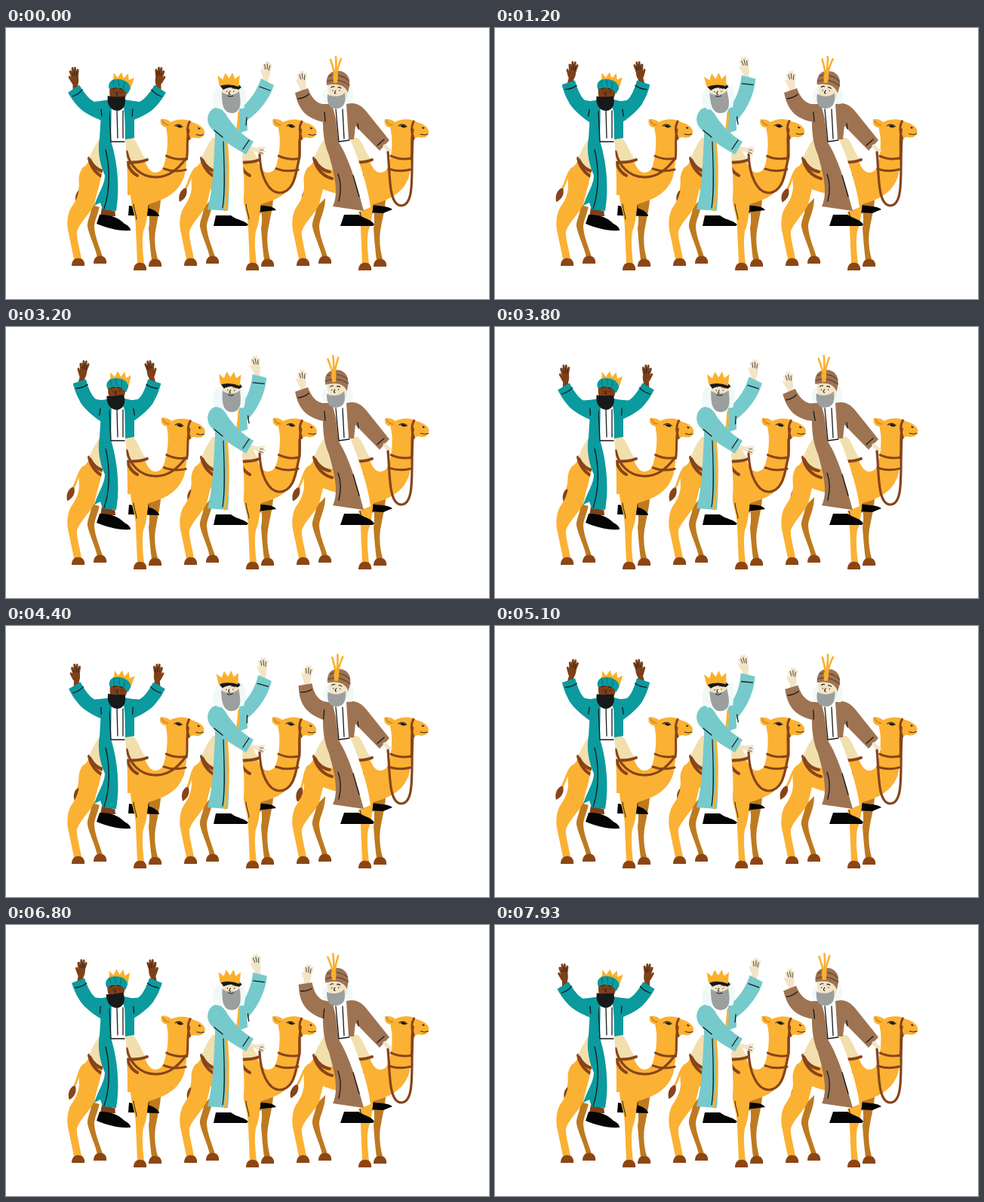
Animation, 640 px wide and 360 px high, one loop 8.01 s. Source, as an HTML page:

```html
<!DOCTYPE html>
<html lang="en">
<head>
<meta charset="utf-8">
<title>Three riders waving</title>
<style>
html, body { margin: 0; width: 100%; height: 100%; overflow: hidden; background: #fff; }
svg { display: block; width: 100%; height: 100%; }
</style>
</head>
<body>
<svg id="stage" viewBox="0 0 640 360"></svg>
<script>
const LOOP = 8010;
const gold = '#fbb133', shade = '#be7a20', hoof = '#8c4614', strap = '#87441a', cream = '#f2dfae';
const teal = '#0b9a9e', sky = '#76cacb', brown = '#9e7352', ink = '#17191b', crown = '#fbb02c';
const dark = '#7f4018', pale = '#f3e4c6', grey = '#9ba09f', white = '#fff', cloth = '#f0f9f8';

const fill = (color, d) => `<path fill="${color}" d="${d}"/>`;
const line = (color, width, d) =>
  `<path fill="none" stroke="${color}" stroke-width="${width}" stroke-linecap="round" stroke-linejoin="round" d="${d}"/>`;
const part = (id, body) => `<g id="${id}">${body}</g>`;
const shift = (x, body) => `<g transform="translate(${x})">${body}</g>`;

// Open palm, wrist at (x, y), fingers up
const hand = (x, y, color, angle) => `<g transform="translate(${x} ${y}) rotate(${angle}) scale(.85 1.02)">` +
  fill(color, 'M-5 6 L-4 -3 C-7 -8 -6 -15 -4 -16 L4 -16 C7 -12 6 -6 4 -2 L5 6Z') +
  line(color, 3.4, 'M-4 -14 L-6 -20 M-1 -15 L-2 -24 M2 -15 L2 -24 M4 -13 L6 -21 M-4 -6 L-8 -13') +
  line(ink, .8, 'M-2.5 -15 L-4 -21 M.7 -15 L0 -22 M3.4 -14 L4 -20') + '</g>';

const feet = (...spots) => spots.map(([x, y]) =>
  fill(hoof, `M${x - 9} ${y} C${x - 9} ${y - 7} ${x - 5} ${y - 11} ${x + 1} ${y - 10} C${x + 6} ${y - 10} ${x + 9} ${y - 5} ${x + 8} ${y}Z`)).join('');

const tail = i => part('tail' + i,
  line(gold, 3, 'M103 186 C96 190 95 204 88 215') +
  fill(strap, 'M90 213 C92 220 89 227 81 231 C79 224 81 217 87 213Z'));

const farLegs =
  fill(shade, 'M125 226 C125 244 117 254 117 264 C118 278 123 288 128 304 L121 305 C118 290 111 278 108 264 C107 256 113 248 113 238Z' +
    'M187 226 L205 228 C204 242 201 252 199 264 C196 278 197 292 201 307 L193 308 C191 292 190 280 189 266 C191 256 190 246 188 236Z') +
  feet([125, 313], [198, 317]);

const body =
  fill(gold, 'M126 150 C114 158 114 176 104 184 C96 191 96 200 97 210 C97 222 91 232 86 239 C81 248 80 262 83 273 L90 307 L100 307 ' +
    'C98 294 93 278 94 270 C98 258 112 246 117 234 L122 214 C136 220 150 222 165 222 C166 238 172 250 172 266 L174 313 L183 313 ' +
    'C181 296 180 282 182 270 C187 258 187 246 189 234 C210 228 227 220 235 200 L239 178 L212 172 C210 186 205 193 196 192 C183 189 182 157 165 149Z') +
  feet([96, 316], [178, 322]) +
  line(ink, 1, 'M169 234 C170 244 173 249 173 254 M189 236 L188 246');

const saddle =
  line(strap, 4, 'M110 173 C113 187 122 197 134 200 M158 166 C160 184 166 192 174 196') +
  fill(cream, 'M125 146 C117 156 113 166 110 174 C115 184 126 189 132 189 L160 178 C170 176 178 176 187 176 C178 168 177 154 168 146Z') +
  line(strap, 4, 'M111 175 C116 185 124 190 131 191 M160 179 C170 178 178 179 187 175');

const camelHead = i => part('neck' + i,
  fill(gold, 'M206 192 C212 176 214 160 213 144 L211 132 C205 132 202 126 204 121 C210 121 214 122 217 125 ' +
    'C226 120 239 120 246 125 C254 127 261 131 262 137 C262 145 255 147 248 145 C242 146 240 150 240 156 ' +
    'C238 170 240 186 235 200Z') +
  line(shade, 1.2, 'M206 123 C208 128 211 129 214 129') +
  part('eye' + i, fill(ink, 'M224 130 C227 128 231 129 232 132 C229 133 226 132 224 130Z') + line(ink, 1, 'M222 130 C226 127 230 128 233 131')) +
  part('lid' + i, line(ink, 1.2, 'M218 132 C224 130 229 129 233 130')) +
  fill(ink, 'M253 131 L257 133 L254 134Z') + line(ink, .9, 'M251 141 Q256 143 261 141') +
  line(strap, 3, 'M242 124 C238 131 239 139 242 147 M241 135 C238 151 241 161 239 174 M212 170 Q225 176 239 173 M209 187 Q222 192 238 188'));

const shoe = d => fill('#050505', d);
const crownShape = 'M0 0 L-2 -15 L5 -9 L9 -18 L14 -10 L19 -18 L22 -9 L29 -14 L27 2 Q13 -4 0 0Z';
const face = (x, y) => line(ink, 1.1,
  `M${x - 6} ${y - 4} q2 -2 4 -1 M${x + 3} ${y - 4} q2 -1 4 1 M${x} ${y} q-3 4 0 4 M${x - 4} ${y} v.5 M${x + 5} ${y} v.5`);

const tealArm =
  hand(92, 78, dark, -6) +
  fill(teal, 'M82 86 L97 76 C104 87 110 95 117 98 L139 95 L136 126 C119 121 106 114 99 108 C92 101 87 95 82 86Z') +
  line(ink, 1.3, 'M88 91 C94 89 98 86 101 82 M126 108 L127 117');

const rider0 =
  fill(dark, 'M127 239 L144 240 L145 250 L125 250Z') +
  shoe('M124 248 C139 248 149 252 157 260 C162 263 165 265 165 269 C149 270 135 266 120 260Z') +
  fill(white, 'M136 98 L160 98 L158 148 C161 180 162 215 160 240 L143 243 L117 236 L128 190Z') +
  fill(teal, 'M127 97 L140 95 L139 150 C146 172 152 208 146 243 L128 241 L125 232 L117 236 C122 220 131 208 131 196 C124 180 121 162 124 146Z' +
    'M157 95 L170 98 L170 146 L158 148Z') +
  line(ink, 1.3, 'M137 110 L139 151 L157 151 M147 110 L148 146 M155 110 L155 146 M132 162 C138 186 138 216 130 240') +
  part('arm0a', tealArm) +
  `<g transform="translate(294) scale(-1 1)">${part('arm0b', tealArm)}</g>` +
  part('head0',
    fill(dark, 'M138 78 C145 73 157 76 161 81 C160 94 154 101 147 101 C138 99 136 89 138 78Z') +
    fill(ink, 'M135 90 C141 92 149 91 157 91 C160 99 157 109 148 110 C139 110 133 102 135 90Z') +
    face(148, 85) +
    `<g transform="translate(142 73) rotate(12) scale(.9)">${fill(crown, crownShape)}</g>` +
    fill(teal, 'M137 81 C134 72 141 67 148 68 C157 68 165 73 165 81 L161 88 C157 80 148 77 137 81Z') +
    line('#08767c', 1.2, 'M142 69 L143 77 M149 69 L150 77 M157 72 L156 80'));

const rider1 =
  shoe('M278 249 L298 249 C305 255 315 255 321 261 L319 263 L275 263Z') +
  fill(cloth, 'M279 80 C272 92 273 102 278 108 L314 110 C321 101 318 86 314 75Z') +
  fill(white, 'M287 105 L319 107 L319 137 L313 170 C316 200 317 224 312 247 L281 247Z') +
  fill(sky, 'M276 106 L287 109 L292 149 C295 184 297 215 294 243 L267 241 C275 211 275 179 277 145Z' +
    'M309 110 L319 106 L320 136 L308 140Z') +
  line(crown, 3.2, 'M288 113 C292 145 295 175 294 200 C294 219 292 230 290 242 M309 112 C308 132 305 145 304 154') +
  line(ink, 1.2, 'M288 151 C289 180 291 215 287 239') +
  part('arm1',
    hand(344, 70, pale, 6) +
    fill(sky, 'M309 108 C322 98 332 85 338 67 L355 76 C350 92 337 111 319 123 L310 130Z') +
    line(ink, 1.3, 'M336 78 L350 83 M319 119 L318 129')) +
  line(pale, 5, 'M326 160 L339 164') +
  line(pale, 2.6, 'M333 160 L342 159 M334 163 L343 164 M334 165 L340 169') +
  line(ink, .7, 'M337 162 L341 162 M336 165 L341 167') +
  fill(sky, 'M273 108 C281 103 289 109 294 119 C303 132 314 143 328 151 L318 168 C301 158 284 148 270 131 C265 122 267 114 273 108Z') +
  line(ink, 1.3, 'M314 161 L322 149 M276 136 L287 145') +
  part('head1',
    fill(cloth, 'M285 80 C278 90 277 100 281 107 L315 107 C318 98 317 84 312 74Z') +
    fill(pale, 'M286 76 L310 76 C311 94 308 103 298 104 C288 102 286 92 286 76Z') +
    fill(grey, 'M286 85 C292 90 304 90 309 84 C312 99 312 113 299 113 C287 113 286 99 286 85Z') +
    fill(ink, 'M284 77 C292 69 306 70 312 79 L308 82 C301 79 295 77 288 82Z') +
    face(297, 84) + line(ink, 1, 'M294 90 Q298 92 301 90') +
    `<g transform="translate(283 77) rotate(-2) scale(.95)">${fill(crown, crownShape)}</g>`);

const rider2 =
  shoe('M448 248 L467 248 C474 253 484 254 488 261 L486 263 L443 263Z') +
  fill(white, 'M429 101 L456 101 L456 148 C468 175 480 213 483 238 L461 247 L446 246Z') +
  fill(brown, 'M421 103 L431 101 C439 119 438 136 441 152 C456 176 466 213 474 243 L433 237 C442 218 434 191 428 169 C419 149 419 125 421 103Z' +
    'M451 101 C466 97 474 106 480 114 L508 149 L495 163 L463 130 L461 148 L454 148Z') +
  line(ink, 1.3, 'M437 108 L441 151 L455 149 M446 108 L448 147 M440 194 C444 205 444 218 441 230 M460 196 L468 224 M492 156 L501 148 M466 127 L467 134') +
  line(pale, 5, 'M502 157 L507 162') + line(pale, 2.5, 'M505 160 L511 163 M505 161 L508 168') +
  part('arm2',
    hand(393, 83, pale, -2) +
    fill(brown, 'M383 86 L400 80 C404 91 410 99 419 101 L434 101 L430 126 C414 125 400 119 393 110 C387 102 385 95 383 86Z') +
    line(ink, 1.3, 'M387 94 Q396 93 401 88 M422 112 L423 124')) +
  part('head2',
    fill(cloth, 'M427 78 C418 85 418 95 424 100 L458 100 C463 92 460 80 454 76Z') +
    fill(pale, 'M427 75 L453 75 C454 92 450 101 440 102 C430 101 427 91 427 75Z') +
    fill(grey, 'M426 88 C432 92 443 92 449 86 C451 99 448 107 437 107 C428 107 425 100 426 88Z') +
    face(437, 83) +
    fill(brown, 'M425 76 C423 64 430 56 440 57 C450 57 457 65 455 77 L453 86 C449 75 438 73 425 76Z') +
    line('#5f4433', 1.2, 'M426 71 C436 67 447 70 455 76 M428 64 C438 61 449 64 454 70') +
    line(crown, 2.6, 'M436 63 C434 54 432 48 430 42 M437 63 C437 53 438 46 437 38 M438 63 C439 53 442 46 444 41') +
    fill(crown, 'M433 62 L440 62 L439 73 L434 73Z'));

const farShoes = [
  'M163 236 C173 238 181 236 188 239 C196 241 203 246 203 250 L162 249Z',
  'M184 235 C193 237 204 235 209 242 L183 245Z',
  'M187 235 C196 237 208 236 214 241 L202 246 L184 245Z'
];
const reins = [
  'M160 164 C164 184 178 197 196 198 C216 199 228 187 238 174',
  'M336 168 C337 196 347 218 362 219 C383 219 384 191 389 171 L389 149',
  'M506 165 C509 191 506 236 524 236 C543 235 536 188 539 147'
];
const riders = [rider0, rider1, rider2];

document.getElementById('stage').innerHTML = riders.map((rider, i) => {
  const x = [0, 149, 298][i];
  return shift(x, tail(i) + farLegs + shoe(farShoes[i]) + body + saddle + camelHead(i)) +
    (i ? '' : line(strap, 3.2, reins[i])) + rider + (i ? line(strap, 3.2, reins[i]) : '');
}).join('');

// id, pivot x, pivot y, resting angle, peak angle, swings per loop, phase of the peak
const joints = [
  ['arm0a', 125, 105, 0, 16, 4, .55],
  ['arm0b', 125, 105, 0, 16, 4, .55],
  ['arm1', 315, 112, 0, -15, 4, .51],
  ['arm2', 425, 110, -6, 11.5, 4, .3],
  ['head0', 148, 105, -9, 1, 2, .12],
  ['head1', 299, 106, -5, 2, 2, .8],
  ['head2', 439, 104, -3.5, 3.5, 2, .25],
  ['neck0', 218, 196, 0, 1.8, 2, .77],
  ['neck1', 218, 196, -1, 1, 2, .87],
  ['neck2', 218, 196, -.5, .5, 2, .8],
  ['tail0', 103, 186, -17, 0, 4, .55],
  ['tail1', 103, 186, -17, 0, 4, .01],
  ['tail2', 103, 186, -20, 3, 4, .45]
];
const get = id => document.getElementById(id);

function draw(now) {
  const t = now % LOOP;
  for (const [id, x, y, rest, peak, swings, phase] of joints) {
    const k = .5 + .5 * Math.cos(2 * Math.PI * (swings * t / LOOP - phase));
    get(id).setAttribute('transform', `rotate(${rest + (peak - rest) * k} ${x} ${y})`);
  }
  for (let i = 0; i < 3; i++) {
    const shut = i === 2 && t > 5650 && t < 5830;
    get('eye' + i).style.display = shut ? 'none' : '';
    get('lid' + i).style.display = shut ? '' : 'none';
  }
}

const start = performance.now();
function tick() {
  draw(performance.now() - start);
  requestAnimationFrame(tick);
}
tick();
</script>
</body>
</html>
```
